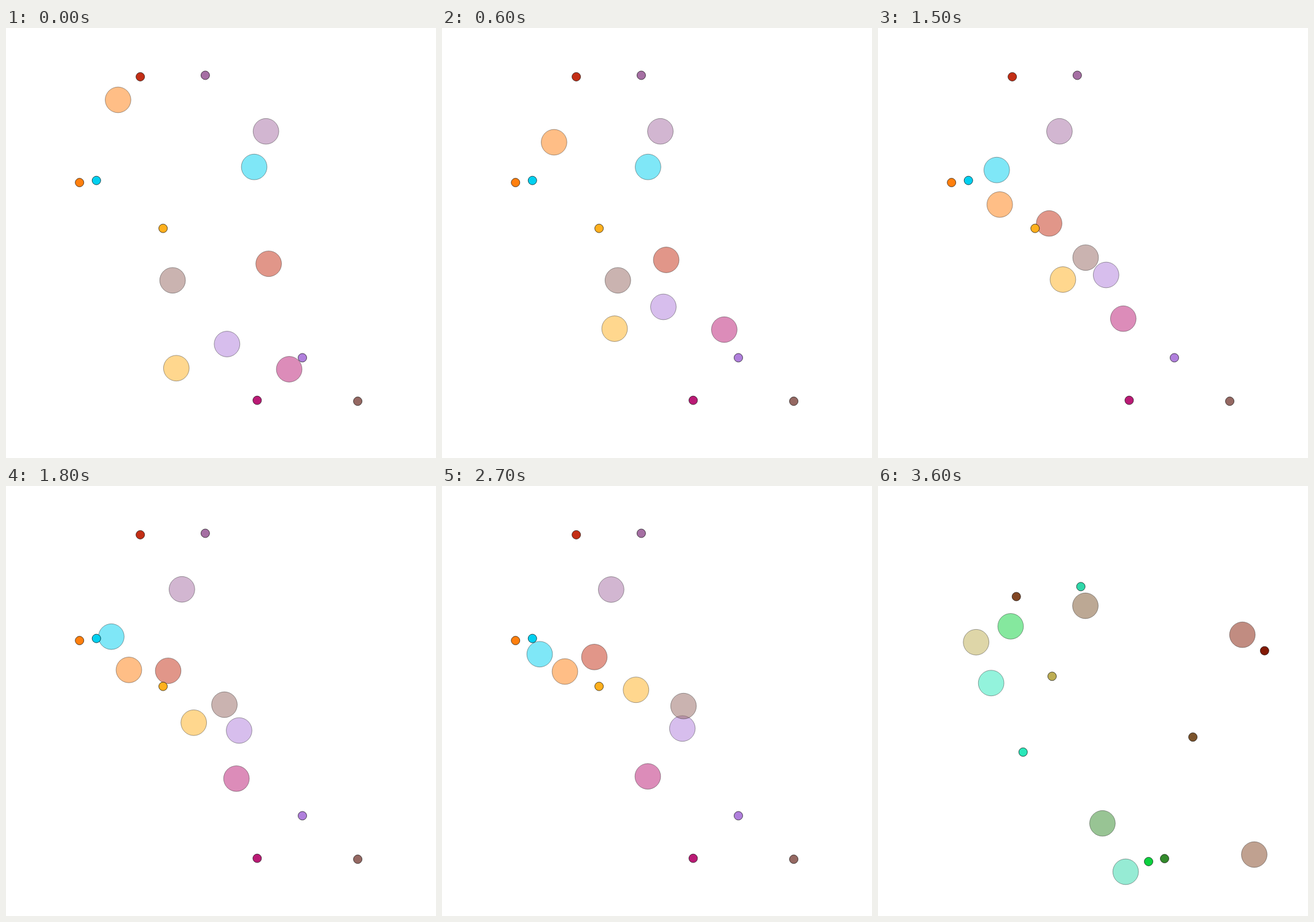
These frames come from a looping animation (700 px wide and 700 px high, 3.75 s). An HTML page with a canvas:

```html
<!DOCTYPE html>
<html lang="en">
<head>
<meta charset="utf-8">
<title>Drifting dots</title>
<style>
  html, body { margin: 0; width: 100%; height: 100%; overflow: hidden; background: #fff; }
  canvas { display: block; width: 100%; height: 100%; }
</style>
</head>
<body>
<canvas id="stage" width="700" height="700"></canvas>
<script>
const ctx = document.getElementById('stage').getContext('2d');
const LOOP = 3750, STEP = 150, CUT = 3600;
const TIMES = [0, 600, 1050, 1500, 2100, 2700, 3450];

// Each pair: colour, landmark position, waypoints of the moving disc
const drifting = [
  { color: '#ffb01e', mark: [255.7, 326.2],
    path: [[277.3, 553.8], [281, 489.5], [303.5, 442.5], [301, 409.5], [311.5, 362.7], [315.8, 331.8]] },
  { color: '#b07fdc', mark: [482.5, 536.8],
    path: [[359.8, 514.5], [360.4, 454], [360.8, 421], [371.3, 402], [386.5, 397.3], [391.3, 394.8]] },
  { color: '#956862', mark: [572.6, 607.6],
    path: [[271.2, 410.8], [286.3, 410.8], [313.7, 410.6], [338, 373.8], [371.8, 346.2], [393.2, 358.2]] },
  { color: '#ba1a75', mark: [408.9, 606.1],
    path: [[461, 555.5], [459.5, 491], [440.8, 469.5], [399.3, 473.2], [355.6, 478.2], [335, 472.7]] },
  { color: '#c32e15', mark: [218.6, 79.4],
    path: [[427.6, 383.8], [365, 377.5], [317.3, 353.4], [278.6, 318.2], [255.4, 288.3], [248, 278.4]] },
  { color: '#ff7f0e', mark: [119.7, 251.6],
    path: [[182.4, 117], [182.4, 186], [190, 250.8], [198.2, 287.4], [200.4, 304.4], [200.1, 302]] },
  { color: '#00d0f0', mark: [147.2, 248.2],
    path: [[404, 226.2], [335.4, 226.2], [263.2, 226.2], [193.3, 231.2], [162, 260.5], [159, 273.8]] },
  { color: '#a56fa3', mark: [324.4, 77],
    path: [[423.2, 168.2], [355.5, 168.2], [317.8, 168.2], [295.4, 168.2], [280.7, 168.3], [275.4, 168.5]] }
];

const fresh = [
  ['#bdad53', 283.4, 309.8, 159.7, 254.3],
  ['#0dd13f', 440.5, 611.4, 215.9, 228.4],
  ['#29e7b9', 236.2, 433.2, 184.2, 320.8],
  ['#7b532b', 512.6, 408.7, 337.6, 195],
  ['#831a05', 629.3, 268.2, 593.2, 242.2],
  ['#338a2b', 466.5, 606.6, 365.4, 549.2],
  ['#2fd7a9', 330.2, 163.8, 403.2, 628],
  ['#814523', 225.2, 180, 612.5, 600]
].map(([color, mx, my, x, y]) => ({ color, mark: [mx, my], path: [[x, y]] }));

// The last stretch coasts a little further in the same direction
for (const dot of drifting) {
  const [a, b] = dot.path.slice(-2);
  dot.path.push(b.map((v, i) => v + 0.4 * (v - a[i])));
}

function spline(values, t) {
  const last = TIMES.length - 1;
  const span = i => TIMES[i + 1] - TIMES[i];
  const slope = i => (values[i + 1] - values[i]) / span(i);
  const tangent = i => {
    if (i === 0) return 0.5 * slope(0);
    if (i === last) return 0.3 * slope(last - 1);
    const before = span(i - 1), after = span(i);
    return (slope(i - 1) * after + slope(i) * before) / (before + after);
  };
  let k = 0;
  while (k < last - 1 && t >= TIMES[k + 1]) k++;
  const h = span(k), u = (t - TIMES[k]) / h, v = 1 - u;
  return values[k] * (1 + 2 * u) * v * v + values[k + 1] * u * u * (3 - 2 * u)
    + h * u * v * (tangent(k) * v - tangent(k + 1) * u);
}

function place(path, t) {
  return path.length === 1 ? path[0] : [0, 1].map(i => spline(path.map(p => p[i]), t));
}

function disc([x, y], radius, color, fillAlpha, lineAlpha) {
  ctx.beginPath();
  ctx.arc(x, y, radius, 0, 2 * Math.PI);
  ctx.globalAlpha = fillAlpha;
  ctx.fillStyle = color;
  ctx.fill();
  ctx.globalAlpha = lineAlpha;
  ctx.strokeStyle = '#000';
  ctx.lineWidth = 1;
  ctx.stroke();
}

function draw(now) {
  const t = Math.floor((now % LOOP) / STEP) * STEP;
  const dots = t < CUT ? drifting : fresh;
  ctx.globalAlpha = 1;
  ctx.fillStyle = '#fff';
  ctx.fillRect(0, 0, 700, 700);
  for (const dot of dots) disc(place(dot.path, t), 20.9, dot.color, 0.5, 0.36);
  for (const dot of dots) disc(dot.mark, 7, dot.color, 1, 0.65);
}

let start;
function tick(now) {
  start ??= now;
  draw(now - start);
  requestAnimationFrame(tick);
}
draw(0);
requestAnimationFrame(tick);
</script>
</body>
</html>
```
